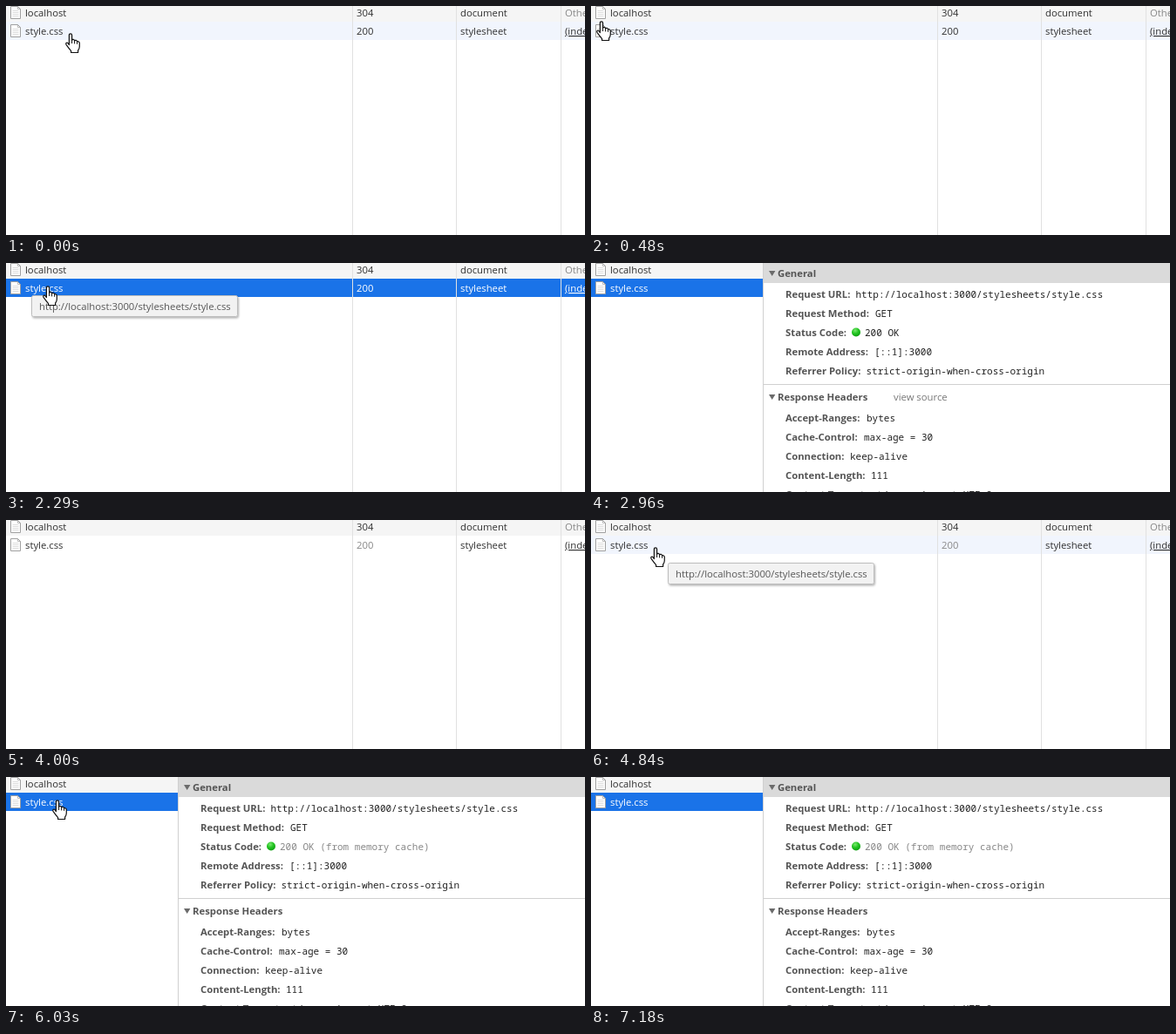
Animation of 664x263 px, one loop 8000 ms. Source, as an HTML page:

```html
<!DOCTYPE html>
<html lang="en">
<head>
<meta charset="utf-8">
<title>Network panel</title>
<style>
  html, body { margin: 0; width: 100%; height: 100%; overflow: hidden; background: #fff; }
  svg { display: block; width: 664px; height: 263px; }
  text { font: 11.3px "Open Sans", sans-serif; fill: #303030; white-space: pre; }
  .label { font-weight: 700; fill: #545454; }
  .mono { font: 11px "Noto Sans Mono", monospace; fill: #222; }
  .dim { fill: #888; }
  .link { text-decoration: underline; }
  .selected text { fill: #fff; }
  .grid { stroke: #e1e1e1; }
</style>
</head>
<body>
<svg viewBox="0 0 664 263">
  <defs>
    <g id="file">
      <path d="M.5.5H8.5L11.5 3.5V14.5H.5Z" fill="#fff" stroke="#a0a0a0"/>
      <path d="M8.5.5V3.5H11.5" fill="none" stroke="#a0a0a0" stroke-width=".7"/>
      <path d="M2.5 5.5H9.5M2.5 7.5H9.5M2.5 9.5H9.5M2.5 11.5H9.5" stroke="#dcdcdc"/>
    </g>
    <radialGradient id="green" cx=".4" cy=".3" r=".75">
      <stop offset="0" stop-color="#7be86f"/>
      <stop offset=".5" stop-color="#22c421"/>
      <stop offset="1" stop-color="#0d9a10"/>
    </radialGradient>
    <filter id="shadow" x="-5%" y="-20%" width="110%" height="150%">
      <feDropShadow dx="1" dy="1.5" stdDeviation="1.2" flood-opacity=".3"/>
    </filter>
  </defs>

  <rect width="664" height="263" fill="#fff"/>
  <rect width="664" height="18" fill="#f5f5f5"/>
  <use href="#file" x="5" y="0"/>
  <text x="22" y="12">localhost</text>
  <text x="402" y="12">304</text>
  <text x="521" y="12">document</text>
  <text x="641" y="12" class="dim">Other</text>

  <g id="row">
    <rect id="rowBack" y="18" width="664" height="21"/>
    <use href="#file" x="5" y="21"/>
    <text x="22" y="33">style.css</text>
    <text x="402" y="33" id="code">200</text>
    <text x="521" y="33">stylesheet</text>
    <text x="641" y="33" class="link">(index)</text>
  </g>
  <path class="grid" d="M397.5 0V263M516.5 0V263M636.5 0V263"/>

  <g id="details">
    <rect x="197" width="467" height="263" fill="#fff"/>
    <rect x="198" width="466" height="23" fill="#dadada"/>
    <path d="M197.5 0V263M198 139.5H664" stroke="#d0d0d0"/>
    <path d="M204 9H211.4L207.7 15ZM204 151H211.4L207.7 157Z" fill="#6b6b6b"/>
    <text x="214" y="16" class="label">General</text>
    <text x="214" y="158" class="label">Response Headers</text>
    <text x="347" y="158" id="viewSource" style="fill:#777">view source</text>
    <g id="fields"></g>
    <circle cx="304" cy="79.5" r="5" fill="url(#green)"/>
    <text x="314" y="84" class="mono" id="status"></text>
  </g>

  <g id="tip">
    <rect x="29.5" y="37.5" width="236" height="24" rx="2" fill="#f2f2f2" stroke="#bdbdbd" filter="url(#shadow)"/>
    <text x="38" y="54" style="fill:#575757">http://localhost:3000/stylesheets/style.css</text>
  </g>

  <g id="hand" stroke="#111" stroke-linejoin="round">
    <path fill="#fff" stroke-width="1.2" d="M4.4 13.6V2.6Q4.4 .8 6 .8T7.6 2.6V8.2Q8 7.2 9.2 7.4T10.6 9Q11 8.2 12.2 8.4T13.6 10Q14 9.4 15 9.7T16.3 11.4V15.5Q16.3 18 14.6 20V22.5H6.6V20.6Q4 17.5 1.2 13.6Q.2 12 1.4 11.3T3.4 12.2Z"/>
    <path fill="none" d="M7.6 8V12M10.6 9V12.4M13.6 10V12.8"/>
  </g>
  <path id="arrow" d="M.5.5V16.5L4.2 13L6.8 18.6L9 17.7L6.5 12.2H11.5Z" fill="#fff" stroke="#111"/>
</svg>
<script>
const LOOP = 8000;
const el = id => document.getElementById(id);
const show = (id, on) => el(id).setAttribute("display", on ? "inline" : "none");
const move = (id, x, y) => el(id).setAttribute("transform", `translate(${x} ${y})`);

// label, value, value x, baseline
const fields = [
  ["Request URL:", "http://localhost:3000/stylesheets/style.css", 303.5, 40],
  ["Request Method:", "GET", 326, 62],
  ["Status Code:", "", 0, 84],
  ["Remote Address:", "[::1]:3000", 325, 106],
  ["Referrer Policy:", "strict-origin-when-cross-origin", 315.5, 128],
  ["Accept-Ranges:", "bytes", 316, 182],
  ["Cache-Control:", "max-age = 30", 313, 204],
  ["Connection:", "keep-alive", 297, 226],
  ["Content-Length:", "111", 321, 248],
  ["Content-Type:", "text/css; charset=UTF-8", 308, 270]
];
el("fields").innerHTML = fields.map(([label, value, x, y]) =>
  `<text class="label" x="223" y="${y}">${label}</text><text class="mono" x="${x}" y="${y}">${value}</text>`
).join("");

// start time, pointer shape, left, top
const pointer = [
  [0, "hand", 68, 31], [120, "hand", 52, 27], [240, "hand", 31, 20],
  [360, "hand", 12, 15], [480, "hand", 6, 17], [610, "hand", 11, 20],
  [730, "hand", 26, 26], [880, "hand", 38, 26], [1040, "hand", 42, 26],
  [2960, "", 0, 0],
  [4410, "arrow", 67, 73], [4560, "arrow", 77, 45], [4700, "hand", 67, 32],
  [4840, "hand", 68, 31], [5620, "hand", 53, 26],
  [6540, "hand", 62, 32], [6660, "arrow", 78, 43], [6790, "arrow", 92, 51],
  [6910, "arrow", 100, 56], [7050, "arrow", 49, 49], [7180, "", 0, 0]
];
// start time, opacity, dx, dy
const tips = [
  [0, 0, 0, 0], [730, .5, 0, 0], [880, 1, 0, 0], [2430, 0, 0, 0],
  [4700, .5, 59, 12], [4840, 1, 59, 12], [5910, .06, 59, 12], [6030, 0, 0, 0]
];
const at = (steps, t) => steps.findLast(step => step[0] <= t);
const within = (t, from, to) => t >= from && t < to;

function draw(t) {
  const second = t >= 3880;
  const selected = within(t, 2290, 3880) || t >= 5910;
  const hover = t < 2290 || within(t, 4700, 5910);

  show("row", !within(t, 3880, 4000));
  el("row").setAttribute("class", selected ? "selected" : "");
  el("rowBack").setAttribute("fill", selected ? "#1a73e8" : hover ? "#f1f5fd" : "#fff");
  el("code").setAttribute("class", second ? "dim" : "");

  show("details", within(t, 2430, 3880) || t >= 6030);
  show("viewSource", !second);
  el("status").textContent = second ? "200 OK (from memory cache)" : "200 OK";
  el("status").setAttribute("class", second ? "mono dim" : "mono");

  const [, opacity, dx, dy] = at(tips, t);
  el("tip").setAttribute("opacity", opacity);
  move("tip", dx, dy);

  const [, shape, x, y] = at(pointer, t);
  for (const id of ["hand", "arrow"]) {
    show(id, id === shape);
    move(id, x, y);
  }
}

const start = performance.now();
function tick() {
  draw((performance.now() - start) % LOOP);
  requestAnimationFrame(tick);
}
tick();
</script>
</body>
</html>
```
